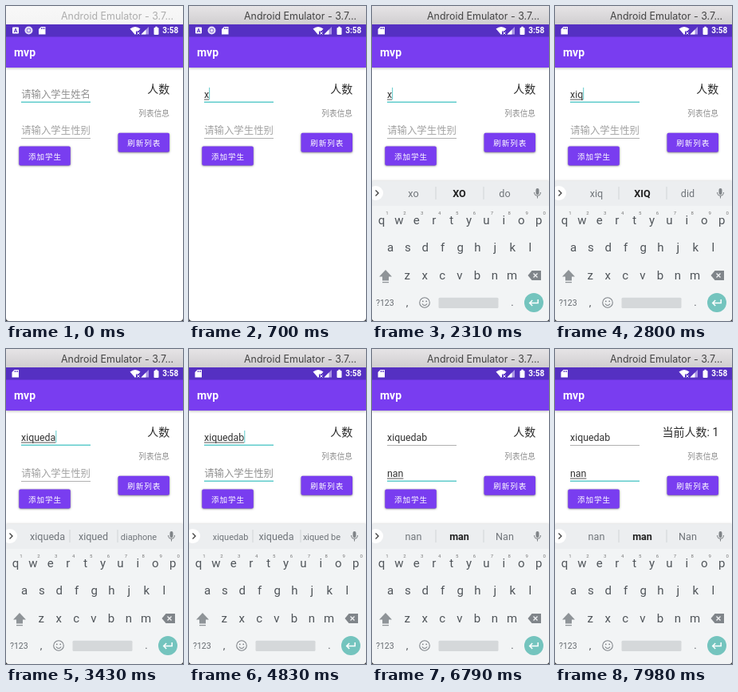
An HTML page with a canvas for the animation above (8 s loop, 222 px wide and 394 px high).

```html
<!DOCTYPE html>
<html lang="zh-CN">
<head>
<meta charset="utf-8">
<title>mvp</title>
<style>
html, body { margin: 0; width: 100%; height: 100%; overflow: hidden; background: #fff; }
canvas { display: block; width: 222px; height: 394px; }
</style>
</head>
<body>
<canvas></canvas>
<script>
const LOOP = 8000, TEAL = '#5fcbcb', PURPLE = '#793df0', DARK = '#5530c2';
const canvas = document.querySelector('canvas');
const scale = window.devicePixelRatio || 1;
canvas.width = 222 * scale;
canvas.height = 394 * scale;
const c = canvas.getContext('2d');

// time, name field, gender field, suggestions (* marks a bold one)
const states = [
  [0, '', '', ''],
  [700, 'x', '', ''],
  [980, 'xo', '', ''],
  [1260, 'xoa', '', 'xoa|*XOA|cia'],
  [2170, 'xo', '', 'xo|*XO|do'],
  [2310, 'x', '', 'xo|*XO|do'],
  [2450, 'x', '', 'x|*X|xx'],
  [2590, 'xi', '', 'xi|*XI|xii'],
  [2730, 'xiq', '', 'xiq|*XIQ|did'],
  [2870, 'xiqu', '', 'xiqu|*dig|disc'],
  [3080, 'xique', '', 'xique|*dique|xi'],
  [3220, 'xiqued', '', 'xiqued|xique|died'],
  [3430, 'xiqueda', '', 'xiqueda|xiqued|diaphone'],
  [3640, 'xiquedab', '', 'xiquedab|xiqueda|xiqued be'],
  [4900, 'xiquedab', '', ''],
  [6020, 'xiquedab', 'n', 'n|*N|no'],
  [6160, 'xiquedab', 'na', 'na|*an|Na'],
  [6300, 'xiquedab', 'nan', 'nan|*man|Nan']
];
const cursorOn = [[700, 4200], [4690, 5250], [6020, 6790], [7290, 7790]];

const progress = (t, from, to) => Math.max(0, Math.min(1, (t - from) / (to - from)));

function text(s, x, y, size, color, align = 'left', weight = 400, family = 'Roboto') {
  c.font = `${weight} ${size}px ${family}, "Noto Sans CJK SC", sans-serif`;
  c.textAlign = align;
  c.fillStyle = color;
  c.fillText(s, x, y);
}
function rect(x, y, w, h, color, r = 0) {
  c.fillStyle = color;
  c.beginPath();
  c.roundRect(x, y, w, h, r);
  c.fill();
}
function disc(x, y, r, color) {
  c.fillStyle = color;
  c.beginPath();
  c.arc(x, y, r, 0, 7);
  c.fill();
}
function shape(d, color, stroke = 0) {
  const path = new Path2D(d);
  c.fillStyle = c.strokeStyle = color;
  c.lineWidth = stroke;
  if (stroke) c.stroke(path); else c.fill(path);
}
function shadow(color, blur, dy) {
  c.shadowColor = color;
  c.shadowBlur = blur * scale;
  c.shadowOffsetY = dy * scale;
}

function titleBar(active) {
  const g = c.createLinearGradient(0, 0, 0, 23);
  g.addColorStop(0, active ? '#e6e4e6' : '#f8f8f8');
  g.addColorStop(1, active ? '#d0ced0' : '#f4f4f4');
  rect(0, 0, 222, 23, g);
  text('Android Emulator - 3.7...', 69, 17, 12.45, active ? '#444' : '#adadad', 'left', 400, 'Inter');
}

function sdCard(x) {
  shape(`M${x + 3} 26h5.5v9.5h-8.5v-6.5z`, '#fff');
  for (let i = 0; i < 3; i++) rect(x + 3 + i * 1.8, 27, 0.9, 2, DARK);
}

function appBars(keyboardUp) {
  shadow('#0004', 3, 1);
  rect(0, 38, 222, 39, PURPLE);
  shadow('transparent', 0, 0);
  rect(0, 23, 222, 15.4, DARK);
  text('mvp', 10, 63, 14, '#fff', 'left', 700);
  if (keyboardUp) sdCard(7.5);
  else {
    rect(8, 26.5, 8, 8, '#fff', 1);
    text('A', 12, 33, 7, DARK, 'center', 700);
    disc(28.5, 30.5, 5, '#e4def7');
    disc(28.5, 30.5, 2.7, '#7d63d0');
    disc(28.5, 30.5, 1.9, '#e4def7');
    sdCard(41);
  }
  shape('M155.5 28.5Q162 23.5 168.5 28.5L162 36z', '#fff');
  shape('M163 31.5h6v5h-6z', DARK);
  shape('M164.5 32.5l3 3m0-3l-3 3', '#fff', 1);
  shape('M169.5 35.5L179 26v9.5z', '#a994e4');
  shape('M169.5 35.5L175.5 29.5v6z', '#fff');
  rect(185.5, 27, 6, 9, '#fff', 1);
  rect(187.3, 25.8, 2.4, 2, '#fff');
  text('3:58', 196.3, 34.3, 10, '#fff', 'left', 700);
}

function field(y, value, hint, focus, composing, cursor) {
  const base = y + 15;
  let end = 19;
  if (value) {
    text(value, 19, base, 12.4, '#333');
    end += c.measureText(value).width;
    if (composing) rect(19, base + 1.5, end - 19, 1, '#555');
  } else text(hint, 19.2, base, 12.4, focus > 0 ? '#909090' : '#a2a2a2');
  rect(19, y + 20, 87, 1, '#b0b0b0');
  c.globalAlpha = focus;
  rect(19, y + 19.6, 87, 1.4, TEAL);
  c.globalAlpha = 1;
  if (cursor) rect(end, y + 2, 1, 15, TEAL);
}

function button(x, y, label, t = 0) {
  shadow('#0008', 2.5, 0.6);
  rect(x, y, 64.5, 24, PURPLE, 2);
  shadow('transparent', 0, 0);
  if (t >= 7280) {
    c.save();
    c.clip();
    const fade = 0.25 * (1 - progress(t, 7500, 7960));
    disc(x + 32, y + 12, 6 + 32 * progress(t, 7280, 7560), `rgba(255,255,255,${fade})`);
    c.restore();
  }
  c.letterSpacing = '0.9px';
  text(label, x + 32.7, y + 16, 9.6, '#fff', 'center', 500);
  c.letterSpacing = '0px';
}

function suggestionBar(list) {
  rect(0, 219, 222, 31, '#eceef0');
  disc(5, 234, 9, '#fff');
  shape('M4.5 230.5l3.5 3.5l-3.5 3.5', '#444', 1.4);
  if (list) {
    for (const x of [79.5, 139.5]) rect(x, 226, 1, 16, '#d0d3d5');
    list.split('|').forEach((word, i) => {
      const bold = word[0] === '*';
      if (bold) word = word.slice(1);
      text(word, [52, 109.5, 166.5][i], 238.5, word.length > 7 ? 11 : 12.6,
        bold ? '#222' : '#70757a', 'center', bold ? 700 : 400);
    });
  }
  rect(205.5, 228, 4, 8, '#808488', 2);
  shape('M203.5 233a4 4.3 0 0 0 8 0M207.5 237.5v3', '#808488', 1.1);
}

function keyboard(list) {
  shadow('#0003', 3, 0);
  rect(0, 219, 222, 180, '#f2f4f5');
  shadow('transparent', 0, 0);
  suggestionBar(list);
  [['qwertyuiop', 12, 273], ['asdfghjkl', 23, 307], ['zxcvbnm', 44.3, 342]].forEach(([keys, x, y]) => {
    [...keys].forEach((key, i) => text(key, x + i * 21.9, y, 15, '#50555a', 'center'));
  });
  for (let i = 0; i < 10; i++) text((i + 1) % 10, 19 + i * 21.9, 261, 6, '#777', 'center');
  shape('M17 330l8 8.5h-4v5h-8v-5h-4z', '#8f9498');
  rect(13, 345, 8, 1.3, '#8f9498');
  shape('M195.5 337l5-6h11.5v12h-11.5z', '#80858a');
  shape('M202.5 334.5l5 5m0-5l-5 5', '#f2f4f5', 1.3);
  text('?123', 5, 375, 10.5, '#666b70');
  text(',', 44, 375, 13, '#50555a', 'center');
  shape('M59.7 371a6.3 6.3 0 1 0 12.6 0a6.3 6.3 0 1 0 -12.6 0M62.8 372.5q3.2 4 6.4 0', '#80858a', 1.1);
  disc(63.8, 369.3, 0.9, '#80858a');
  disc(68.2, 369.3, 0.9, '#80858a');
  rect(83.5, 364.8, 75, 13.2, '#d5d8da', 1.5);
  text('.', 176, 375, 13, '#50555a', 'center');
  disc(203, 371, 12, '#74c4be');
  shape('M208.2 367v4.5h-10.5M201.2 368l-3.5 3.5l3.5 3.5', '#fff', 1.5);
}

function draw(now) {
  const t = now % LOOP;
  const [, name, gender, words] = states.findLast((s) => t >= s[0]);
  const onGender = t >= 4900;
  const cursor = cursorOn.some(([from, to]) => t >= from && t < to);
  c.setTransform(scale, 0, 0, scale, 0, 0);
  rect(0, 0, 222, 394, '#333');
  rect(0, 0, 222, 394, '#fff', [0, 0, 4, 4]);
  c.save();
  c.clip();
  appBars(t >= 1890);
  titleBar(t >= 420);
  field(100, name, '请输入学生姓名', 1 - progress(t, 4840, 4970), !onGender, cursor && !onGender);
  field(145, gender, '请输入学生性别', progress(t, 4690, 4830), true, cursor && onGender);
  text(t < 7420 ? '人数' : '当前人数: 1', 205.3, 109.2, 14, '#2a2a2a', 'right');
  text('列表信息', 205, 138, 9.7, '#8c8c8c', 'right');
  button(16.3, 175.5, '添加学生', t);
  button(140.5, 158.8, '刷新列表');
  if (t > 1820) {
    c.translate(0, 175 * (1 - progress(t, 1820, 2100)) ** 2);
    keyboard(words);
  }
  c.restore();
  requestAnimationFrame(draw);
}
requestAnimationFrame(draw);
</script>
</body>
</html>
```
